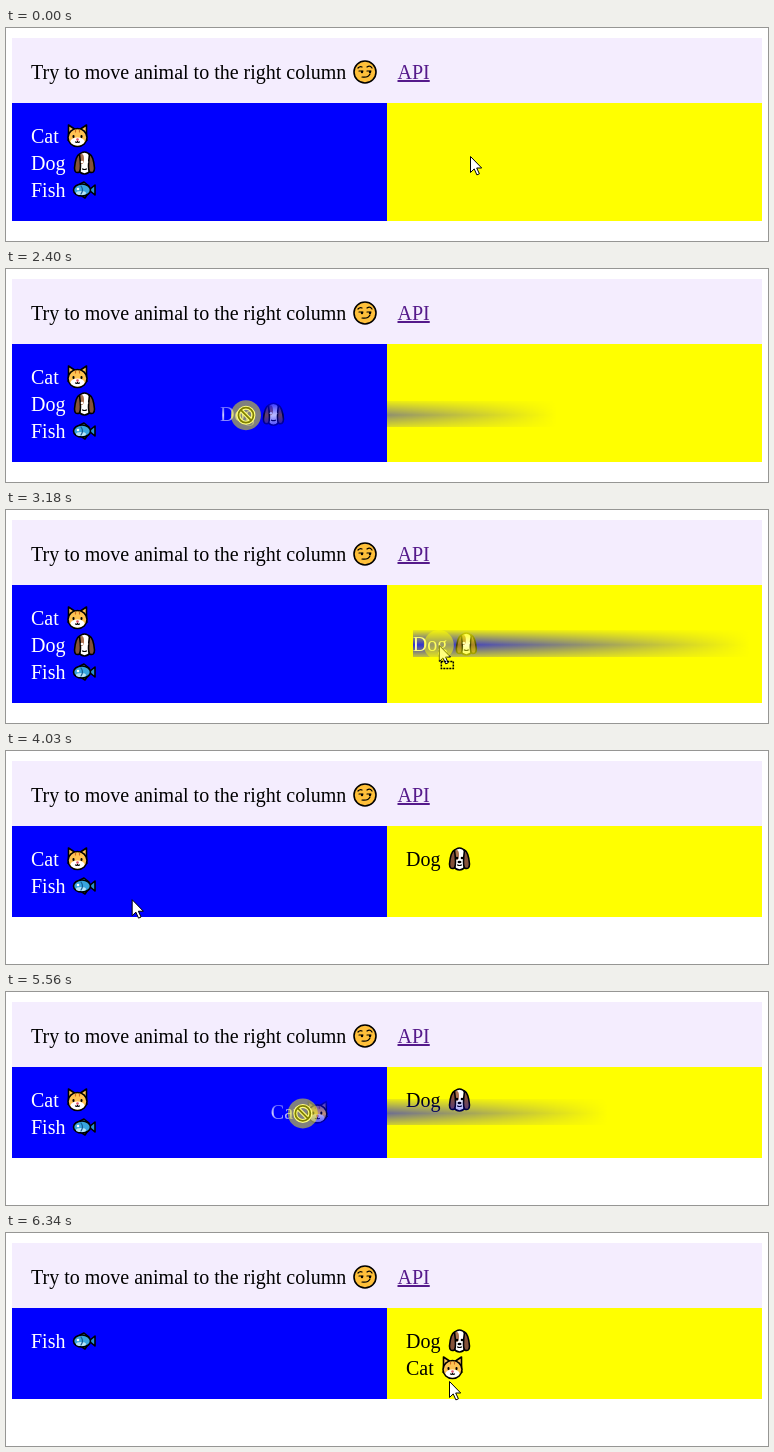
An HTML page that plays this animation: 762x213 px, repeating every 7.12 s.

```html
<!DOCTYPE html>
<html lang="en">
<head>
<meta charset="utf-8">
<title>Drag and drop</title>
<style>
html, body { margin: 0; height: 100%; overflow: hidden; background: #fff; }
svg { display: block; font: 20px "Liberation Serif", "Times New Roman", serif; }
.face { stroke: #000; stroke-width: 1.6; stroke-linejoin: round; stroke-linecap: round; }
.plain { stroke: none; }
.thin { stroke-width: 1.2; fill: none; }
</style>
</head>
<body>
<svg width="762" height="213">
  <defs>
    <g id="smirk" class="face">
      <circle r="11" fill="#ffc03a"/>
      <path class="thin" d="M-7-4q2-2 4-1M2-5q3-2 5 1M-6-1h4M2-1h4M-3 5q6 1 8-3"/>
      <circle class="plain" cx="-3" r="1.2"/>
      <circle class="plain" cx="5" r="1.2"/>
    </g>

    <g id="catHalf">
      <path d="M-3-7l-6-4v9" fill="#ffc252"/>
      <path d="M-10 4h3" class="thin"/>
    </g>
    <g id="catFace" class="face">
      <use href="#catHalf"/>
      <use href="#catHalf" transform="scale(-1 1)"/>
      <ellipse cy="1.500" rx="9.500" ry="9" fill="#ffc252"/>
      <ellipse class="plain" cy="5.500" rx="7" ry="4" fill="#fff"/>
      <path class="thin" d="M-2-6v2M2-6v2" stroke="#d06a20"/>
      <path d="M-4 0v1M4 0v1" stroke-width="2"/>
      <path class="thin" d="M-2 6q2 1 2-1q0 2 2 1"/>
      <circle class="plain" cy="3.500" r="1.300" fill="#e0506a"/>
    </g>

    <g id="dogHalf">
      <path d="M-5-9q-4 2-5 14q0 6 5 4q2-3 0-18" fill="#84523a"/>
      <circle class="plain" cx="-2.500" cy="-1" r="1.300"/>
    </g>
    <g id="dogFace" class="face">
      <ellipse rx="8" ry="11" fill="#fff"/>
      <ellipse class="plain" cx="-3" cy="-4" rx="2.500" ry="5" fill="#a9714f"/>
      <use href="#dogHalf"/>
      <use href="#dogHalf" transform="scale(-1 1)"/>
      <ellipse class="plain" cy="3" rx="2" ry="1.300"/>
      <path class="thin" d="M-2 6q2 1 4 0"/>
    </g>

    <g id="fishFace" class="face">
      <path d="M5 0l6-5v10z" fill="#2b8fd0"/>
      <path d="M-4-6l4-2 5 4M-2 6l3 2 2-3" fill="#2b8fd0"/>
      <ellipse cx="-2" rx="8.500" ry="6" fill="#38a5df"/>
      <ellipse class="plain" cx="-3" cy="3" rx="5" ry="2" fill="#b6e3f7"/>
      <path class="thin" d="M-3-4q3 4 0 8" stroke="#155a93"/>
      <circle class="plain" cx="-6" cy="-1" r="1.300"/>
    </g>

    <g id="cat"><text>Cat</text><use href="#catFace" x="46.500" y="-7"/></g>
    <g id="dog"><text>Dog</text><use href="#dogFace" x="53.500" y="-7"/></g>
    <g id="fish"><text>Fish</text><use href="#fishFace" x="53" y="-7"/></g>

    <linearGradient id="along">
      <stop offset=".08" stop-color="#fff" stop-opacity=".8"/>
      <stop offset="1" stop-color="#fff" stop-opacity="0"/>
    </linearGradient>
    <linearGradient id="across" x2="0" y2="1">
      <stop stop-color="#fff" stop-opacity=".1"/>
      <stop offset=".55" stop-color="#fff"/>
      <stop offset="1" stop-color="#fff" stop-opacity=".3"/>
    </linearGradient>
    <mask id="fadeX" maskUnits="userSpaceOnUse" x="0" y="-21" width="337" height="27">
      <rect y="-21" width="337" height="27" fill="url(#along)"/>
    </mask>
    <mask id="fadeY" maskUnits="userSpaceOnUse" x="0" y="-21" width="337" height="27">
      <rect y="-21" width="337" height="27" fill="url(#across)"/>
    </mask>
    <g id="ban"><circle r="7.500"/><path d="M-5-5L5 5"/></g>
  </defs>

  <rect x="6" y="10" width="750" height="65" fill="#f4edfe"/>
  <text x="25" y="51">Try to move animal to the right column</text>
  <use href="#smirk" x="359" y="44"/>
  <text x="391.500" y="51" fill="#551a8b" text-decoration="underline">API</text>

  <rect class="col" x="6" y="75" width="375" fill="#00f"/>
  <rect class="col" x="381" y="75" width="375" fill="#ff0"/>
  <use id="catRow" href="#cat"/>
  <use id="dogRow" href="#dog"/>
  <use id="fishRow" href="#fish"/>

  <g id="ghost" mask="url(#fadeX)" fill="#fff">
    <g mask="url(#fadeY)">
      <rect y="-21" width="337" height="27" fill="#00f"/>
      <use id="ghostRow"/>
    </g>
  </g>
  <g id="pointer">
    <g id="arrow" stroke="#000">
      <path d="M.5.500v16l3.700-3.600 2.700 6 2.500-1.100-2.700-5.800h5z" fill="#fff"/>
      <path id="moveBox" d="M2.500 16.500h12v7h-12z" fill="none" stroke-width="1.500" stroke-dasharray="2 1"/>
    </g>
    <g id="noDrop" fill="none">
      <use href="#ban" stroke="#fff" stroke-width="4"/>
      <use href="#ban" stroke="#000" stroke-width="1.800"/>
    </g>
    <circle id="press" r="15" fill="#ff0" fill-opacity=".5"/>
  </g>
</svg>
<script>
const LOOP = 7120;
const $ = id => document.getElementById(id);
const cols = document.querySelectorAll('.col');

// Pointer strokes; bow bends the path, ease slows its end
const strokes = [
  { from: 0, to: 0, n: 1, x: 464, y: 128 },
  { from: 400, to: 460, n: 2, x: 258, y: 124 },
  { from: 710, to: 780, n: 2, x: 47, y: 166 },
  { from: 1100, to: 1640, n: 8, x: 57, y: 140 },
  { from: 2080, to: 2780, n: 10, x: 330, y: 130, bow: 13, ease: 1.6 },
  { from: 2860, to: 3260, n: 6, x: 434, y: 136, ease: 2.5 },
  { from: 3640, to: 4330, n: 10, x: 83, y: 139, bow: 28, ease: 2.3 },
  { from: 4410, to: 4950, n: 8, x: 66, y: 113 },
  { from: 5410, to: 6110, n: 10, x: 381, y: 151, bow: -4, ease: 3.7 },
  { from: 6190, to: 6340, n: 3, x: 443, y: 148 }
];

function pointerAt(t) {
  const i = strokes.findLastIndex(s => s.from <= t);
  const { from, to, n, x, y, bow = 0, ease = 1 } = strokes[i];
  const a = strokes[i - 1] || strokes[i];
  // The picture advances in n equal steps; the slack absorbs timer rounding
  const step = (to - from) / (n - 1) || 1;
  const p = Math.min(n, Math.floor((t - from) / step + .1) + 1) / n;
  const e = 1 - (1 - p) ** ease;
  return [a.x + (x - a.x) * e, a.y + (y - a.y) * p + bow * Math.sin(Math.PI * e)];
}

const place = (el, x, y) => el.setAttribute('transform', `translate(${x} ${y})`);
const show = (el, on) => el.setAttribute('visibility', on ? 'visible' : 'hidden');

function row(name, right, line) {
  const el = $(name + 'Row');
  place(el, right ? 400 : 25, 115 + 27 * line);
  el.setAttribute('fill', right ? '#000' : '#fff');
}

function draw(t) {
  const [x, y] = pointerAt(t);
  const dogMoved = t >= 3260, catMoved = t >= 6340;
  const dogDrag = t >= 2080 && !dogMoved;
  const catDrag = t >= 5410 && !catMoved;
  const drag = dogDrag || catDrag;
  const over = x >= 381;

  cols.forEach(c => c.setAttribute('height', dogMoved ? 91 : 118));
  row('cat', catMoved, catMoved ? 1 : 0);
  row('dog', dogMoved, dogMoved ? 0 : 1);
  row('fish', false, 2 - dogMoved - catMoved);

  $('ghostRow').setAttribute('href', catDrag ? '#cat' : '#dog');
  place($('ghost'), x - (catDrag ? 32 : 26), y + 6);
  show($('ghost'), drag);

  place($('pointer'), x, y);
  show($('arrow'), !drag || over);
  show($('moveBox'), drag && over);
  show($('noDrop'), drag && !over);
  show($('press'), t >= 1870 && !dogMoved || t >= 5180 && !catMoved);
}

function tick() {
  draw(performance.now() % LOOP);
  requestAnimationFrame(tick);
}
tick();
</script>
</body>
</html>
```
